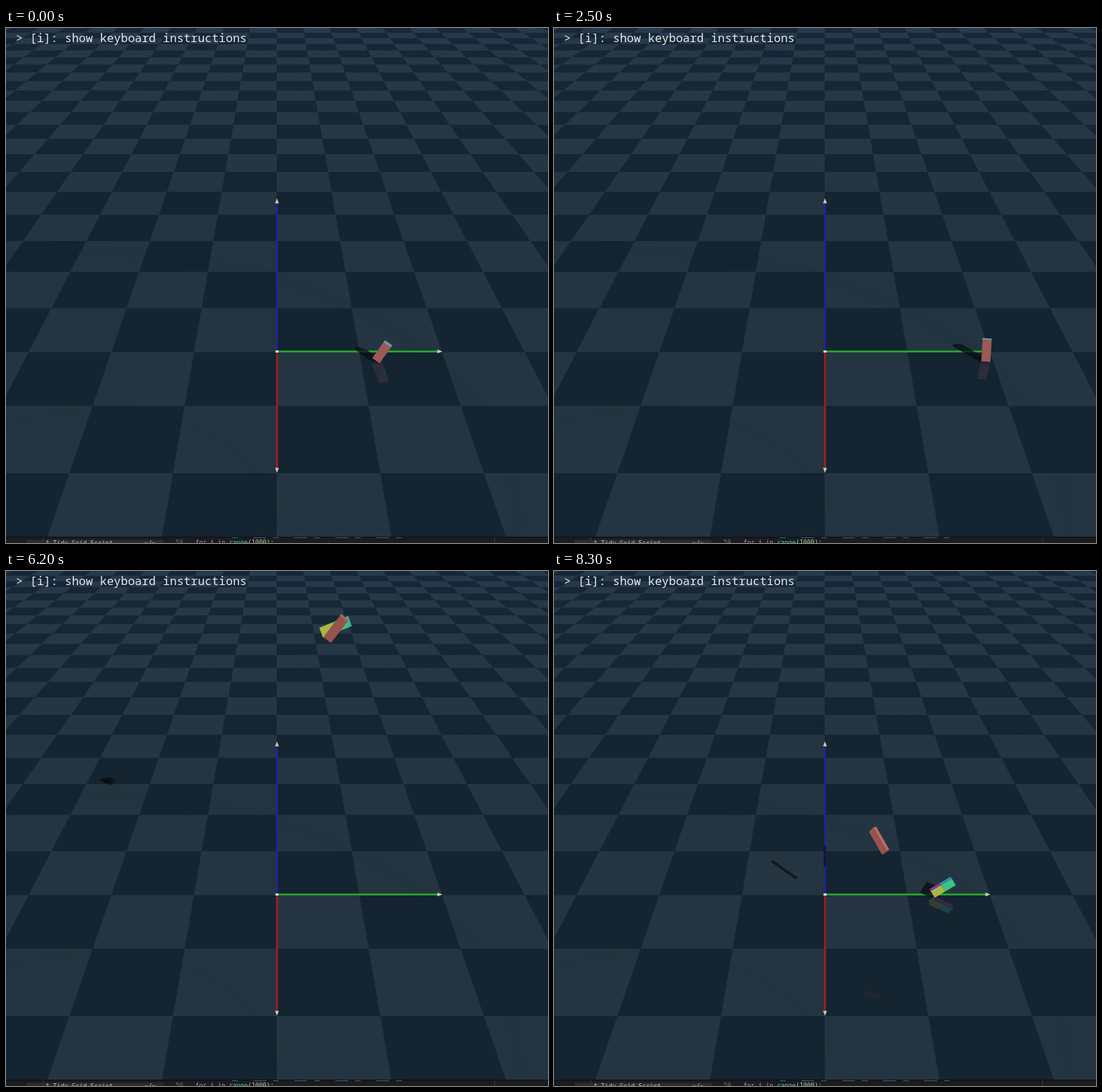
These frames come from a looping animation (767x730 px, 8400 ms). An HTML page with a canvas:

```html
<!DOCTYPE html>
<html lang="en">
<head>
<meta charset="utf-8">
<title>Tumbling blocks</title>
<style>
  html, body { margin: 0; width: 100%; height: 100%; overflow: hidden; background: #142430; }
  canvas, svg { position: absolute; left: 0; top: 0; display: block; }
  text { white-space: pre; }
  .hint { font: 16.5px "Noto Sans Mono", "DejaVu Sans Mono", monospace; fill: #e4e8eb; }
  .code { font: 8.8px "DejaVu Sans Mono", monospace; fill: #b9bcc0; }
</style>
</head>
<body>
<canvas id="view" width="767" height="730"></canvas>
<svg width="767" height="730" viewBox="0 0 767 730">
  <text class="hint" x="14" y="20">&gt; [i]: show keyboard instructions</text>
  <rect y="721" width="767" height="9" fill="#1b1c1d"/>
  <rect y="721" width="767" height="1.5" fill="#0e1215"/>
  <rect x="29" y="725.5" width="194" height="5" fill="#2b2c2d"/>
  <path d="M52.5 722v4M691.5 722v8" stroke="#3a3b3c"/>
  <path d="M320 722.5H566" stroke="#46606c" stroke-dasharray="8 22 18 10"/>
  <text class="code" x="56" y="733">* Tidy Grid Script</text>
  <text class="code" x="196" y="733">~/~</text>
  <text class="code" x="240" y="731.5" style="fill:#6e7681">59</text>
  <text class="code" x="268" y="731.5"><tspan fill="#c586c0">for</tspan> i <tspan fill="#c586c0">in</tspan> <tspan fill="#4ec9b0">range</tspan>(<tspan fill="#b5cea8">1000</tspan>):</text>
</svg>
<script>
const W = 767, H = 730, LOOP = 8.4, FPS = 10;
const view = document.getElementById('view').getContext('2d');
const CAM = [7, 0, 5];

const add = (a, b, s = 1) => a.map((v, i) => v + b[i] * s);
const dot = (a, b) => a[0] * b[0] + a[1] * b[1] + a[2] * b[2];
const unit = a => a.map(v => v / Math.hypot(...a));
const mix = (a, b, f) => a.map((v, i) => v + (b[i] - v) * f);
const clamp = v => Math.min(1, Math.max(0, v));
const ease = v => v * v * (3 - 2 * v);
const cross = (a, b) => [
  a[1] * b[2] - a[2] * b[1],
  a[2] * b[0] - a[0] * b[2],
  a[0] * b[1] - a[1] * b[0]
];

// World units are floor tiles: x towards the viewer, y right, z up.
function project([x, y, z]) {
  const w = 9.888 - x - 0.577 * z;
  return [383 + 1157 * y / w, -217 + (6689 - 1336 * z) / w];
}

function trace(g, pts) {
  pts.forEach((p, i) => i ? g.lineTo(...p) : g.moveTo(...p));
  g.closePath();
}

function fill(g, pts, color) {
  g.beginPath();
  trace(g, pts);
  g.fillStyle = color;
  g.fill();
}

function line(g, a, b, color, width) {
  g.beginPath();
  g.moveTo(...a);
  g.lineTo(...b);
  g.strokeStyle = color;
  g.lineWidth = width;
  g.stroke();
}

function shade(g, top, bottom) {
  const s = g.createLinearGradient(0, 0, 0, 250);
  s.addColorStop(0, top);
  s.addColorStop(1, bottom);
  return s;
}

function ring(g, size, width) {
  g.beginPath();
  g.ellipse(130, 700, size, size * 0.64, 0, 0, 7);
  g.strokeStyle = 'rgba(24,38,50,.08)';
  g.lineWidth = width;
  g.stroke();
}

function drawFloor(g) {
  g.fillStyle = shade(g, '#172737', '#142431');
  g.fillRect(0, 0, W, H);
  const light = shade(g, '#27394a', '#243541');
  for (let x = -21; x < 3; x++) {
    for (let y = -12; y < 12; y++) {
      if ((x + y) % 2) continue;
      fill(g, [[x, y, 0], [x, y + 1, 0], [x + 1, y + 1, 0], [x + 1, y, 0]].map(project), light);
    }
  }
  ring(g, 595, 20);
  ring(g, 250, 10);
}

// An arrow along one screen direction, with a pale tip.
function arrow(g, dx, dy, length, color) {
  g.save();
  g.translate(383.5, 458.5);
  g.rotate(Math.atan2(dy, dx));
  line(g, [0, 0], [length - 6, 0], color, 2.5);
  fill(g, [[length, 0], [length - 7, 2.7], [length - 7, -2.7]], '#c9c9c2');
  g.restore();
}

function drawAxes(g) {
  arrow(g, 0, -1, 217, '#2121a0');
  arrow(g, 1, 0, 234, '#27ae27');
  arrow(g, 0, 1, 172, '#a91c1c');
  g.fillStyle = '#f2f4f2';
  g.fillRect(381.5, 457, 4, 3);
}

// Quadratic curve through three poses at the times 6.7, 7.6 and 8.3
function curve(t, [a, b, c]) {
  const u = t - 6.7;
  return a.map((v, i) => {
    const s1 = (b[i] - v) / 0.9, s2 = (c[i] - b[i]) / 0.7;
    return v + s1 * u + (s2 - s1) / 1.6 * u * (u - 0.9);
  });
}

// A pose: position, direction of the long side, roll
function slide(t) {
  const lean = 0.41 - 0.17 * t - 1.1 * Math.max(0, Math.sin(Math.PI * t / 1.9));
  return [
    0.2 - 0.015 * t, 1.24 + 0.74 * ease(t / 3.1), 0.148,
    0.12 - 0.14 * t, Math.sin(lean), Math.cos(lean), -0.2
  ];
}

function toss(t, poses, offset) {
  if (t >= 6.7) return curve(t, poses);
  const s = t - 5.6;
  const height = Math.max(0.14, 4.7 - 10 * (s - 0.22) ** 2);
  const air = [-0.31 + 0.76 * s + offset, 0.13 + 0.73 * s, height];
  const place = mix(air, poses[0].slice(0, 3), clamp((t - 6.4) / 0.3));
  const turn = mix([0.16, 0.14, 0.17, 0.1], poses[0].slice(3), s / 1.1);
  return t > 6.4 ? [...place, ...turn] : [...air, ...turn];
}

const plainPoses = [
  [0.764, 0.977, 0.14, 0.05, 0.12, 0.25, 0.3],
  [0.6, 0.451, 0.509, 0.04, 0.09, 0.19, -0.6],
  [0.54, 0.58, 1.099, -0.16, -0.11, 0.14, -0.87]
];
const brightPoses = [
  [0.088, 1.036, 0.09, 0.01, 0.25, 0.05, 0.35],
  [-0.057, 1.041, 0.12, -0.12, -0.22, 0.01, -0.2],
  [0.017, 1.414, 0.13, -0.03, 0.2, 0.125, 0.25]
];

// Skins list the colours of: ends, front and back, then the two long edges.
const blocks = [
  { from: 0, to: 3.1, half: [0.135, 0.032, 0.052], pose: slide,
    skin: ['#79938e', '#744043', '#9c5a56', '#804845', '#b5437f #3fa9a2 #b5437f', '#744043'] },
  { from: 5.6, to: LOOP, half: [0.145, 0.035, 0.05], pose: t => toss(t, brightPoses, -0.03),
    skin: ['#3cb6a4', '#a9b648', '#a8b648 #3ec281', '#a85f5a', '#c23a94', '#8c35ac #2f8dad'] },
  { from: 5.6, to: LOOP, half: [0.145, 0.022, 0.045], pose: t => toss(t, plainPoses, 0.03),
    skin: ['#ac645d', '#7f4743', '#98534d', '#844944', '#b46c65', '#7c4541'] }
];

function build({ half, skin, pose }, t) {
  const k = pose(t), center = k.slice(0, 3), roll = k[6];
  const long = unit(k.slice(3, 6));
  const look = [0.866, 0, 0.5];
  const n = unit(add(look, long, -dot(look, long)));
  const front = add(n.map(v => v * Math.cos(roll)), cross(long, n), Math.sin(roll));
  const dirs = [long, front, cross(long, front)];
  const sides = dirs.map((d, i) => d.map(v => v * half[i]));
  const patches = skin.flatMap((colors, face) => {
    const axis = face >> 1, side = face % 2 ? -1 : 1;
    const [i, j] = [0, 1, 2].filter(q => q !== axis);
    const mid = add(center, sides[axis], side);
    const at = (u, v) => add(add(mid, sides[i], u), sides[j], v);
    return colors.split(' ').map((color, c, all) => {
      const u0 = 2 * c / all.length - 1, u1 = u0 + 2 / all.length;
      return {
        color, mid,
        normal: dirs[axis].map(v => v * side),
        pts: [at(u0, -1), at(u1, -1), at(u1, 1), at(u0, 1)]
      };
    });
  });
  return { center, patches };
}

function paint(g, { patches }, mirror = 1) {
  const eye = [CAM[0], CAM[1], CAM[2] * mirror];
  for (const p of patches) {
    if (dot(p.normal, add(eye, p.mid, -1)) <= 0) continue;
    fill(g, p.pts.map(([x, y, z]) => project([x, y, z * mirror])), p.color);
  }
}

function reflect(g, block) {
  g.globalAlpha = clamp(0.2 - 0.12 * block.center[2]);
  paint(g, block, -1);
  g.globalAlpha = 1;
}

function castShadow(g, { center, patches }) {
  g.beginPath();
  for (const { pts } of patches) {
    const q = pts.map(([x, y, z]) => project([x - z, y - z, 0]));
    const area = q.reduce((s, a, i) => {
      const b = q[(i + 1) % 4];
      return s + a[0] * b[1] - b[0] * a[1];
    }, 0);
    trace(g, area < 0 ? q.reverse() : q);
  }
  g.fillStyle = 'rgba(9,14,18,.74)';
  g.fill();

  // Shade on the upright axis
  const [x, y, z] = center, h = z - x;
  if (Math.abs(x - y) < 0.1 && h > 0.1 && h < 2) {
    line(g, project([0, 0, h - 0.15]), project([0, 0, h + 0.15]), '#10163a', 3);
  }
}

const floor = document.createElement('canvas');
floor.width = W;
floor.height = H;
drawFloor(floor.getContext('2d'));

function frame() {
  const t = Math.floor(performance.now() / 1000 % LOOP * FPS + 1e-6) / FPS;
  const shown = blocks.filter(b => t >= b.from && t < b.to).map(b => build(b, t));
  view.drawImage(floor, 0, 0);
  shown.forEach(b => reflect(view, b));
  drawAxes(view);
  shown.forEach(b => castShadow(view, b));
  shown.forEach(b => paint(view, b));
  requestAnimationFrame(frame);
}
frame();
</script>
</body>
</html>
```
